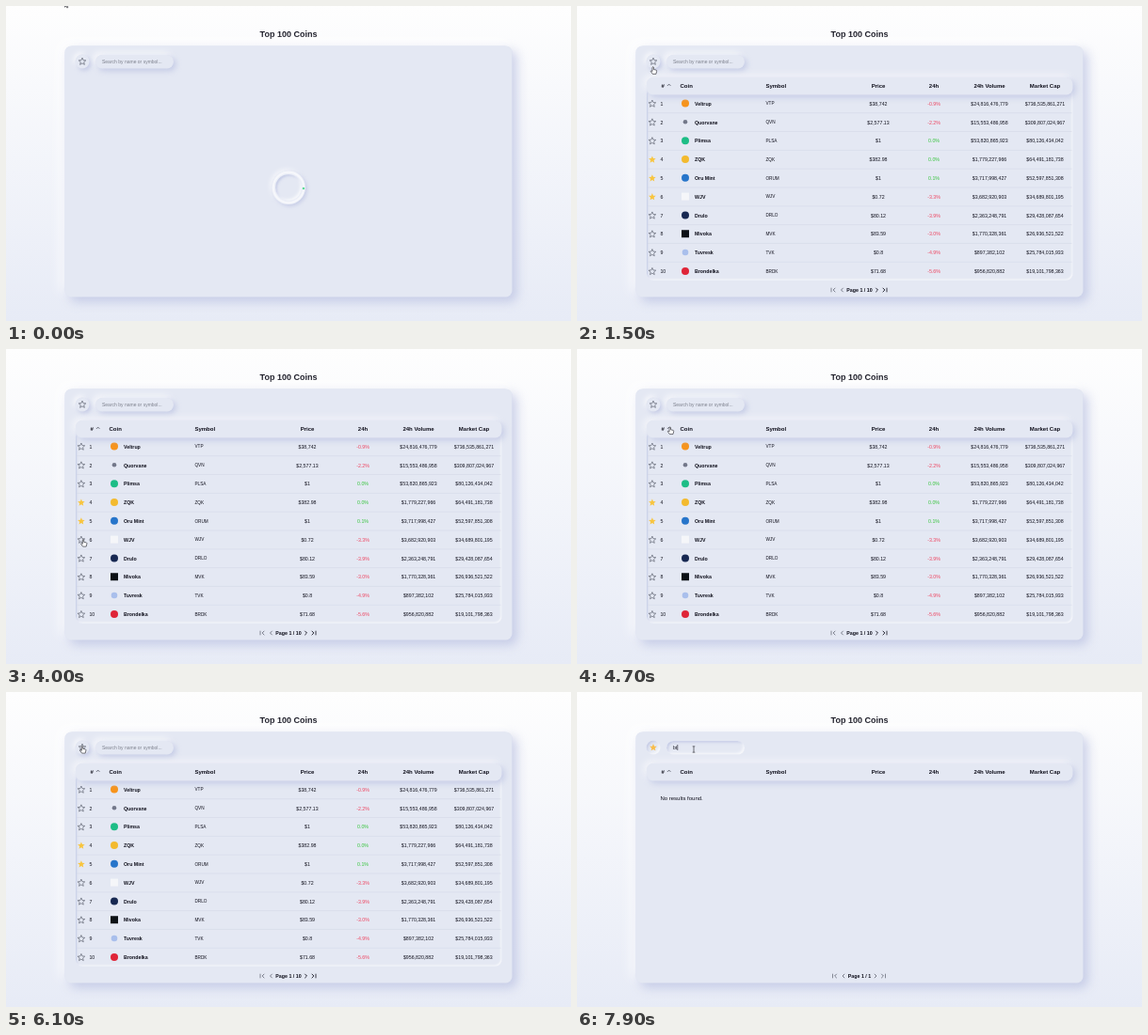
An HTML page with a canvas for the animation above (8000 ms loop, 600 px wide and 335 px high).

```html
<!DOCTYPE html>
<html lang="en">
<head>
<meta charset="utf-8">
<title>Top 100 Coins</title>
<style>
  html, body { margin: 0; width: 100%; height: 100%; overflow: hidden; background: #f3f5fb; }
  canvas { display: block; width: 600px; height: 335px; }
</style>
</head>
<body>
<canvas id="stage"></canvas>
<script>
const W = 600, H = 335, LOOP = 8000;
const canvas = document.getElementById('stage');
const ctx = canvas.getContext('2d');
const dpr = window.devicePixelRatio || 1;
canvas.width = W * dpr;
canvas.height = H * dpr;

const FACE = '#e4e8f3', LIGHT = 'rgba(255,255,255,.75)', DARK = 'rgba(172,180,220,.62)';
const INK = '#10101c', GREY = '#6b6f7c', GOLD = '#f8c53f';
const ROW_Y = 103.8, ROW_H = 19.82;

// rank | name | symbol | price | 24h | volume | cap | icon colour | icon radius | icon shape
const parse = text => text.trim().split('\n').map(line => {
  const [rank, name, symbol, price, change, volume, cap, color, r, shape] = line.trim().split('|');
  return { rank, name, symbol, price, change, volume, cap, color, r: +r, shape };
});

const top10 = parse(`
  1|Veltrup|VTP|$38,742|-0.9%|$24,816,476,779|$736,535,861,271|#f7931a|4
  2|Quorvane|QVN|$2,577.13|-2.2%|$15,553,486,958|$309,807,024,967|#727789|2.3
  3|Plimsa|PLSA|$1|0.0%|$53,820,865,923|$80,126,434,042|#1dbd86|4
  4|ZQK|ZQK|$382.98|0.0%|$1,779,227,966|$64,491,181,738|#f3ba2f|4
  5|Oru Mint|ORUM|$1|0.1%|$3,717,998,427|$52,597,851,308|#2775ca|4
  6|WJV|WJV|$0.72|-3.3%|$3,682,920,903|$34,689,801,195|#f5f6f9|4|sq
  7|Drulo|DRLO|$80.12|-3.9%|$2,363,248,791|$29,428,087,654|#172852|4
  8|Mivoka|MVK|$83.59|-3.0%|$1,770,328,361|$26,936,521,522|#0c1116|4|sq
  9|Tuvresk|TVK|$0.8|-4.9%|$897,382,102|$25,784,015,933|#a9bfec|3.3
  10|Brondelka|BRDK|$71.68|-5.6%|$956,820,882|$19,101,798,363|#df2538|4`);

const last10 = parse(`
  100|Thurvelox Cluster Token|TVX|$3.88|3.9%|$74,805,142|$826,542,469|#11265c|4
  99|Gorlet Savings|GLV|$15.96|-2.7%|$12,616,700|$851,594,960|#33343c|2.5
  98|HOV|HVO|$0.09|-3.0%|$15,060,702|$853,994,340|#4fb8cb|3.7
  97|Wendrusk|WDK|$0.73|0.3%|$129,133,862|$915,654,349|#3c83ea|2.8
  96|PulVEK|PVK|$1.08|-1.5%|$47,488,080|$931,741,594|#f0c3cb|4
  95|Yorv|YORV|$90.03|-0.2%|$183,448,622|$956,043,473|#a8cff0|4
  94|Trosk Protocol|TSK|$3.67|-15.6%|$155,661,248|$961,022,295|#14211d|4|sq
  93|Plain Courtesy Token|PCY|$0.65|-1.7%|$66,773,011|$979,097,285|#d95a35|3.2
  92|Zul Dollar|ZULD|$1|0.1%|$5,232,826|$986,966,905|#35a56c|4
  91|KrupToken|KPT|$6.55|-3.5%|$7,090,809|$994,738,228|#e0443c|3.8`);

// Moments at which the interface switches state
const AT = { load: 300, unstar6: 3700, sortDown: 4900, sortUp: 5500,
             filter: 6250, unstar5: 6700, focus: 7000, key1: 7800, key2: 7900 };

// Pointer path: time, x, y
const path = [
  [0, 62.5, -5], [600, 58.5, 1], [1000, 78, 14], [1800, 82, 88], [2400, 83.5, 222],
  [3100, 83.5, 222], [3400, 82, 202.5], [4100, 82, 202.5], [4500, 98, 76], [4700, 98.8, 83],
  [5600, 98.8, 83], [6000, 81, 57.5], [6300, 81, 57.5], [6600, 81, 120], [6750, 81, 120],
  [6980, 124, 61], [LOOP, 124, 61]
];

function pointer(t) {
  const i = path.findIndex((p, k) => k && t <= p[0]);
  const [t0, x0, y0] = path[i - 1], [t1, x1, y1] = path[i];
  const u = (t - t0) / (t1 - t0), e = u * u * (3 - 2 * u);
  return [x0 + (x1 - x0) * e, y0 + (y1 - y0) * e];
}

function text(str, x, y, size, { bold = false, color = INK, align = 'left' } = {}) {
  ctx.font = `${bold ? 'bold ' : ''}${size}px "Liberation Sans", Arial, sans-serif`;
  ctx.fillStyle = color;
  ctx.textAlign = align;
  ctx.fillText(str, x, y + size * 0.36);
}

function shadow(offset, blur, color) {
  ctx.shadowOffsetX = ctx.shadowOffsetY = offset * dpr;
  ctx.shadowBlur = blur * dpr;
  ctx.shadowColor = color;
}

function box(x, y, w, h, r) {
  const p = new Path2D();
  p.roundRect(x, y, w, h, r);
  return p;
}

function raised(shape, offset, blur, fill = FACE) {
  ctx.save();
  ctx.fillStyle = fill;
  shadow(-offset, blur, LIGHT);
  ctx.fill(shape);
  shadow(offset, blur, DARK);
  ctx.fill(shape);
  ctx.restore();
}

function inset(shape, offset, blur) {
  const ring = new Path2D();
  ring.rect(-100, -100, W + 200, H + 200);
  ring.addPath(shape);
  ctx.save();
  ctx.clip(shape);
  ctx.fillStyle = FACE;
  ctx.fill(shape);
  for (const [o, c] of [[offset, DARK], [-offset, LIGHT]]) {
    shadow(o, blur, c);
    ctx.fill(ring, 'evenodd');
  }
  ctx.restore();
}

function line(points, color, width) {
  ctx.beginPath();
  points.forEach(([x, y]) => ctx.lineTo(x, y));
  ctx.strokeStyle = color;
  ctx.lineWidth = width;
  ctx.stroke();
}

function star(x, y, r, color) {
  ctx.beginPath();
  for (let i = 0; i < 10; i++) {
    const a = i * Math.PI / 5 - Math.PI / 2, d = i % 2 ? r * 0.45 : r;
    ctx.lineTo(x + d * Math.cos(a), y + d * Math.sin(a));
  }
  ctx.closePath();
  if (color) {
    ctx.fillStyle = color;
    ctx.fill();
  } else {
    ctx.strokeStyle = '#555a68';
    ctx.lineWidth = 0.65;
    ctx.stroke();
  }
}

function backdrop() {
  const g = ctx.createLinearGradient(0, 0, 0, H);
  g.addColorStop(0, '#fefefe');
  g.addColorStop(1, '#e7ebf6');
  ctx.fillStyle = g;
  ctx.fillRect(0, 0, W, H);
  text('Top 100 Coins', 300, 29.3, 9, { bold: true, align: 'center' });
  raised(box(62.5, 42.5, 475, 267, 7), 5, 12);
}

function toolbar(t) {
  const button = box(73.5, 51.5, 15, 15, 7.5), field = box(95, 52, 83, 14.5, 7.25);
  const on = t >= AT.filter;
  on ? inset(button, 1.5, 3) : raised(button, 2, 5);
  star(81, 59.1, 4, on && '#f8bd4c');

  const focused = t >= AT.focus;
  focused ? inset(field, 1.5, 3) : raised(field, 2.5, 6);
  const query = t >= AT.key2 ? 'bt' : t >= AT.key1 ? 'b' : '';
  if (query) text(query, 102, 59, 5);
  else text('Search by name or symbol...', 102, 59, 5, { color: '#7d818d' });
  if (focused && (query || t < AT.focus + 500)) {
    const x = 102.6 + (query ? ctx.measureText(query).width : 0);
    line([[x, 56], [x, 62]], INK, 0.6);
  }
}

function spinner(t) {
  const disc = r => box(300 - r, 193 - r, 2 * r, 2 * r, r);
  raised(disc(18), 1.5, 4, '#eceff7');
  inset(disc(14), 1.5, 3);
  ctx.strokeStyle = 'rgba(255,255,255,.55)';
  ctx.lineWidth = 2;
  ctx.stroke(disc(16.2));
  const a = 0.06 + t / 1000 * 2 * Math.PI;
  ctx.fillStyle = '#5fdc98';
  ctx.beginPath();
  ctx.arc(300 + 16 * Math.cos(a), 193 + 16 * Math.sin(a), 1.3, 0, 7);
  ctx.fill();
}

function header(down) {
  raised(box(74, 76, 452.5, 18.5, 7), 2.5, 7);
  const head = (s, x, align) => text(s, x, 84.7, 6, { bold: true, align });
  head('#', 89.6);
  head('Coin', 109.5);
  head('Symbol', 200.4);
  head('Price', 320, 'center');
  head('24h', 379, 'center');
  head('24h Volume', 438, 'center');
  head('Market Cap', 497, 'center');
  const d = down ? 0.9 : -0.9;
  line([[96, 84 - d], [97.7, 84 + d], [99.4, 84 - d]], '#444856', 0.8);
}

function row(c, i, starred) {
  const y = ROW_Y + i * ROW_H, mid = { align: 'center' };
  star(79.9, y + 0.2, 4, starred && GOLD);
  text(c.rank, 88.4, y, 5.25);
  ctx.fillStyle = c.color;
  ctx.fill(box(115 - c.r, y - 0.3 - c.r, 2 * c.r, 2 * c.r, c.shape ? 0 : c.r));
  text(c.name, 125, y, 5.25, { bold: true });
  text(c.symbol, 200.4, y - 0.2, 4.7);
  text(c.price, 320, y, 5.25, mid);
  text(c.change, 379, y, 5.25, { align: 'center', color: c.change[0] === '-' ? '#ee4460' : '#35c43c' });
  text(c.volume, 438, y, 5.25, mid);
  text(c.cap, 497, y, 5.25, mid);
}

function table(t) {
  const down = t >= AT.sortDown && t < AT.sortUp;
  const starred = c => c.rank === '4' || c.rank === '5' && t < AT.unstar5 || c.rank === '6' && t < AT.unstar6;
  let rows = down ? last10 : top10;
  if (t >= AT.filter) rows = rows.filter(starred);
  if (t >= AT.key2) rows = [];

  if (rows.length) {
    inset(box(74, 86, 452.5, 6.8 + rows.length * ROW_H + 0.8, 7), 1, 2);
    for (let i = 1; i < rows.length; i++) {
      const y = ROW_Y + (i - 0.5) * ROW_H;
      line([[75, y], [525.5, y]], '#d4d9e7', 0.6);
    }
  } else {
    text('No results found.', 88.4, 112.6, 6);
  }
  rows.forEach((c, i) => row(c, i, starred(c)));
  header(down);
  pager(t >= AT.filter);
}

function pager(single) {
  const shift = single ? 1.5 : 0, y = 302, next = single ? GREY : INK;
  const chevron = (x, dir, color) => line([[x - dir, y - 2.2], [x + dir, y], [x - dir, y + 2.2]], color, 0.9);
  const bar = (x, color) => line([[x, y - 2.3], [x, y + 2.3]], color, 0.8);
  bar(270 + shift, GREY);
  chevron(273.2 + shift, -1.1, GREY);
  chevron(281.6 + shift, -1.1, GREY);
  text(single ? 'Page 1 / 1' : 'Page 1 / 10', 300, y, 5.3, { bold: true, align: 'center' });
  chevron(318.4 - shift, 1.1, next);
  chevron(325.8 - shift, 1.1, next);
  bar(329 - shift, next);
}

const ARROW = new Path2D('M0 0V6.2L1.4 4.9L2.3 7L3.3 6.6L2.4 4.6H4.3Z');
const HAND = new Path2D('M-.7 .4Q0-.5.7.4V2.8L3.4 3.4Q4 3.7 3.9 4.6L3.2 7.6H-.4L-2.4 4.8Q-2.3 3.8-1.4 4.3L-.7 4.9Z');
const BEAM = new Path2D('M-1.3-3.2H-.3Q0-3.2 0-2.8Q0-3.2.3-3.2H1.3M0-2.8V2.8M-1.3 3.2H-.3Q0 3.2 0 2.8Q0 3.2.3 3.2H1.3');

function cursor(t) {
  const [x, y] = pointer(t);
  const rowOffset = Math.abs((y - ROW_Y + ROW_H / 2) % ROW_H - ROW_H / 2);
  const overStar = Math.abs(x - 80) < 3 && y > 98 && rowOffset < 4.5;
  const overHash = x > 86 && x < 102 && y > 78 && y < 93;
  const overButton = Math.hypot(x - 81, y - 59) < 7.5;
  const overField = x > 95 && x < 178 && y > 52 && y < 66;

  ctx.save();
  ctx.translate(x, y);
  ctx.lineWidth = 0.6;
  ctx.strokeStyle = '#1c1c22';
  if (overField) {
    ctx.stroke(BEAM);
  } else {
    const shape = overStar || overHash || overButton ? HAND : ARROW;
    ctx.fillStyle = '#fff';
    ctx.fill(shape);
    ctx.stroke(shape);
  }
  ctx.restore();
}

function draw(now) {
  const t = now % LOOP;
  ctx.setTransform(dpr, 0, 0, dpr, 0, 0);
  backdrop();
  toolbar(t);
  t < AT.load ? spinner(t) : table(t);
  cursor(t);
}

const start = performance.now();
(function tick() {
  draw(performance.now() - start);
  requestAnimationFrame(tick);
})();
</script>
</body>
</html>
```
